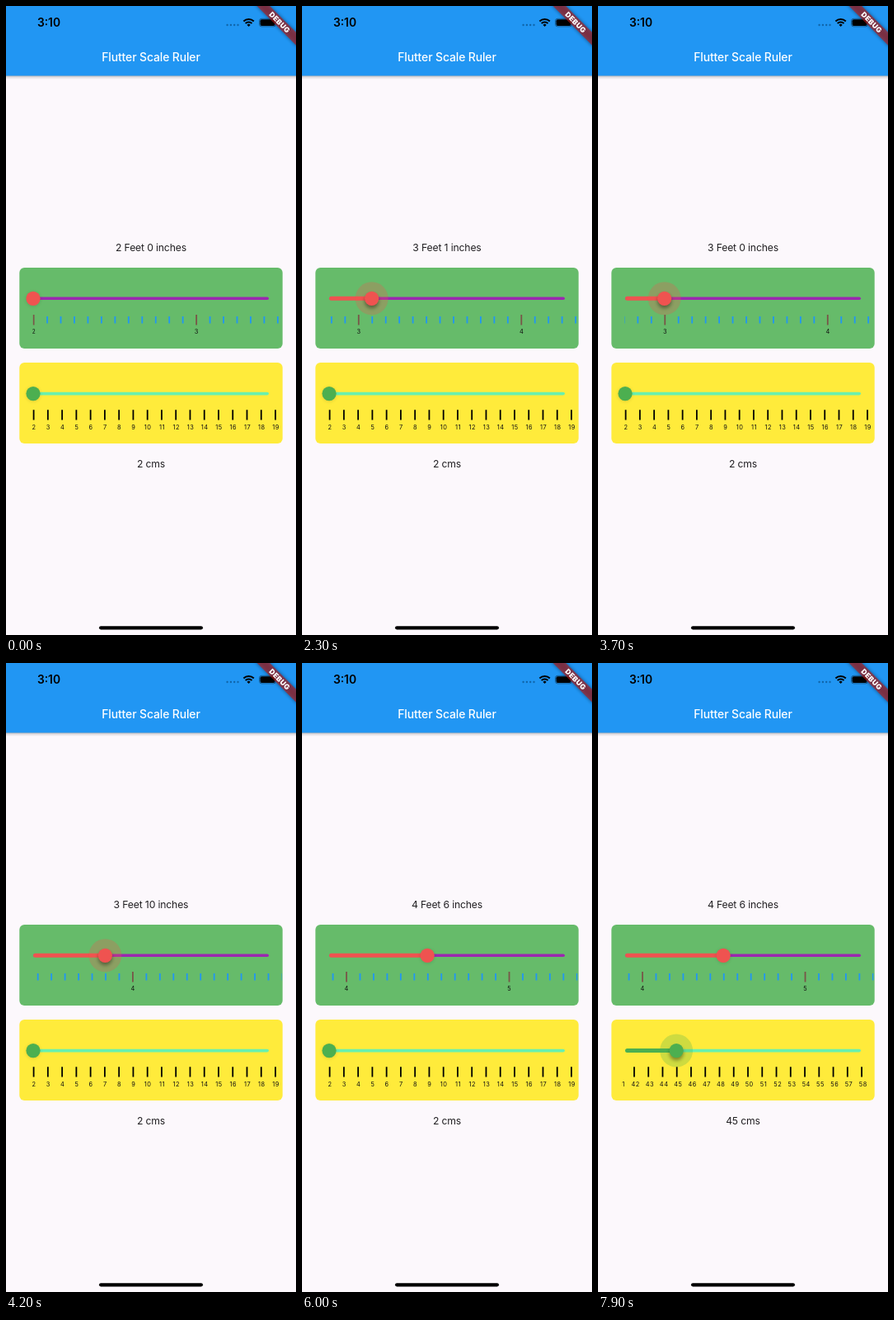
These frames come from a looping animation (352x762 px, 8000 ms). An HTML page:

```html
<!DOCTYPE html>
<html lang="en">
<head>
<meta charset="utf-8">
<title>Flutter Scale Ruler</title>
<style>
  html, body { margin: 0; width: 100%; height: 100%; overflow: hidden; background: #fcf8fc; }
  svg { display: block; width: 352px; height: 762px; }
  text { font-family: Inter, "Open Sans", sans-serif; text-anchor: middle; }
  .readout { font-size: 12.2px; letter-spacing: -.15px; fill: #211f22; }
  .label { font-size: 7.4px; fill: #111; }
  .wide { letter-spacing: .5px; }
</style>
</head>
<body>
<svg viewBox="0 0 352 762">
  <defs>
    <linearGradient id="barShadow" x2="0" y2="1">
      <stop offset="0" stop-opacity=".32"/>
      <stop offset=".4" stop-opacity=".12"/>
      <stop offset="1" stop-opacity="0"/>
    </linearGradient>
    <filter id="soft" x="-50%" y="-50%" width="200%" height="200%"><feGaussianBlur stdDeviation="2.2"/></filter>
    <clipPath id="feetClip"><rect x="32.4" y="365" width="302" height="45"/></clipPath>
    <clipPath id="cmClip"><rect x="28.6" y="480" width="305.4" height="45"/></clipPath>
  </defs>

  <rect width="352" height="762" fill="#fcf8fc"/>
  <rect y="84" width="352" height="5" fill="url(#barShadow)"/>
  <rect width="352" height="84.5" fill="#2196f3"/>
  <text x="176" y="67" fill="#fff" font-size="13.9" font-weight="500" letter-spacing="-.1">Flutter Scale Ruler</text>

  <text x="52" y="25" font-size="13.8" font-weight="600">3:10</text>
  <g fill="#0b5694" opacity=".75">
    <circle cx="268.6" cy="23" r="1.2"/><circle cx="272.9" cy="23" r="1.2"/>
    <circle cx="277.2" cy="23" r="1.2"/><circle cx="281.5" cy="23" r="1.2"/>
  </g>
  <g fill="none" stroke="#000" stroke-width="2">
    <path d="M288.4 18.5a8.8 8.8 0 0 1 12.4 0"/>
    <path d="M290.7 21.1a5.5 5.5 0 0 1 7.8 0"/>
    <path d="M292.5 22.9a3 3 0 0 1 4.2 0l-2.1 2.2z" fill="#000" stroke="none"/>
  </g>
  <rect x="307.5" y="15.3" width="20" height="9.6" rx="2.8" fill="none" stroke="#000" stroke-opacity=".4"/>
  <rect x="308.5" y="16.3" width="18" height="7.6" rx="1.9"/>

  <g transform="translate(352 0) rotate(45)">
    <rect x="-36" y="22.5" width="72" height="11" opacity=".45" filter="url(#soft)"/>
    <rect x="-36" y="22.5" width="72" height="11" fill="#b71c1c" fill-opacity=".63"/>
    <text y="31.2" fill="#fff" font-size="8.7" font-weight="900" letter-spacing=".3">DEBUG</text>
  </g>

  <text id="feetText" class="readout" x="176" y="297.3"></text>
  <text id="cmText" class="readout" x="176" y="558.6"></text>
  <rect x="16.3" y="317" width="319.4" height="98" rx="6" fill="#66bb6a"/>
  <rect x="16.3" y="432" width="319.4" height="98" rx="6" fill="#ffeb3b"/>
  <g id="rulers"></g>
  <rect x="113" y="751.2" width="126" height="4.2" rx="2.1"/>
</svg>

<script>
const LOOP = 8000, STEP = 100, LEFT = 33, LENGTH = 286;
const rulers = document.getElementById('rulers');

function add(parent, tag, attrs, text) {
  const el = document.createElementNS('http://www.w3.org/2000/svg', tag);
  for (const key in attrs) el.setAttribute(key, attrs[key]);
  if (text !== undefined) el.textContent = text;
  parent.append(el);
  return el;
}

// Piecewise linear value from [time, value] pairs.
function at(keys, t) {
  if (t <= keys[0][0]) return keys[0][1];
  for (let i = 1; i < keys.length; i++) {
    const [t0, v0] = keys[i - 1], [t1, v1] = keys[i];
    if (t <= t1) return v0 + (v1 - v0) * (t - t0) / (t1 - t0);
  }
  return keys[keys.length - 1][1];
}

function makeRuler({ min, max, y, pitch, clip, track, active, drawTick }) {
  const strip = add(add(rulers, 'g', { 'clip-path': `url(#${clip})` }), 'g', {});
  for (let n = min; n <= max; n++) drawTick(strip, n, (n - min) * pitch);

  add(rulers, 'rect', { x: LEFT, y: y - 1.8, width: LENGTH, height: 3.6, rx: 1.8, fill: track });
  const done = add(rulers, 'rect', { x: LEFT, y: y - 2.5, height: 5, rx: 2.5, fill: active });
  const knob = add(rulers, 'g', {});
  const halo = add(knob, 'circle', { r: 20, fill: active });
  const shadow = add(knob, 'circle', { r: 8.6, filter: 'url(#soft)' });
  add(knob, 'circle', { r: 8.6, fill: active });

  return (value, press, glow) => {
    const x = (value - min) * LENGTH / (max - min);
    strip.setAttribute('transform', `translate(${LEFT + .6 + x - (value - min) * pitch} 0)`);
    done.setAttribute('width', x);
    knob.setAttribute('transform', `translate(${LEFT + x} ${y})`);
    halo.setAttribute('opacity', .27 * glow);
    shadow.setAttribute('cy', .8 + 2.6 * press);
    shadow.setAttribute('opacity', .12 + .25 * press);
  };
}

function tick(parent, x, top, bottom, color, width) {
  add(parent, 'line', { x1: x, x2: x, y1: top, y2: bottom, stroke: color, 'stroke-width': width });
}

const setFeet = makeRuler({
  min: 24, max: 96, y: 354.3, pitch: 16.46, clip: 'feetClip', track: '#9c27b0', active: '#ef5350',
  drawTick(parent, n, x) {
    if (n % 12) return tick(parent, x, 376, 384.4, '#2196f3', 1.8);
    tick(parent, x, 374, 386.4, '#795548', 1.8);
    add(parent, 'text', { class: 'label', x, y: 397.2 }, n / 12);
  }
});

const setCm = makeRuler({
  min: 2, max: 200, y: 469.6, pitch: 17.26, clip: 'cmClip', track: '#69f0ae', active: '#4caf50',
  drawTick(parent, n, x) {
    tick(parent, x, 489.2, 501.6, '#000', 1.8);
    add(parent, 'text', { class: 'label wide', x: x + (n < 40 ? .5 : 1.7), y: 512.6 }, n);
  }
});

const inchKeys = [[1400, 24], [1700, 26], [2300, 37], [2800, 42], [3100, 42], [3700, 36],
  [4100, 43], [4500, 53], [4600, 53], [4900, 55], [5100, 55], [5200, 54]];
const cmKeys = [[7200, 2], [7300, 4], [7400, 6], [7500, 11], [7900, 45]];
const feetPress = [[1400, 0], [1600, 1], [5400, 1], [5700, 0]];
const cmPress = [[7100, 0], [7200, .3], [7400, .3], [7600, 1]];
const cmGlow = [[7400, 0], [7600, 1]];

const feetText = document.getElementById('feetText');
const cmText = document.getElementById('cmText');
let last = -1;

function draw(now) {
  const t = Math.floor(now % LOOP / STEP) * STEP;
  if (t !== last) {
    last = t;
    const inches = Math.round(at(inchKeys, t)), cms = Math.round(at(cmKeys, t));
    const press = at(feetPress, t);
    setFeet(inches, press, press);
    setCm(cms, at(cmPress, t), at(cmGlow, t));
    feetText.textContent = `${Math.floor(inches / 12)} Feet ${inches % 12} inches`;
    cmText.textContent = `${cms} cms`;
  }
  requestAnimationFrame(() => draw(performance.now() - start));
}

const start = performance.now();
draw(0);
</script>
</body>
</html>
```
